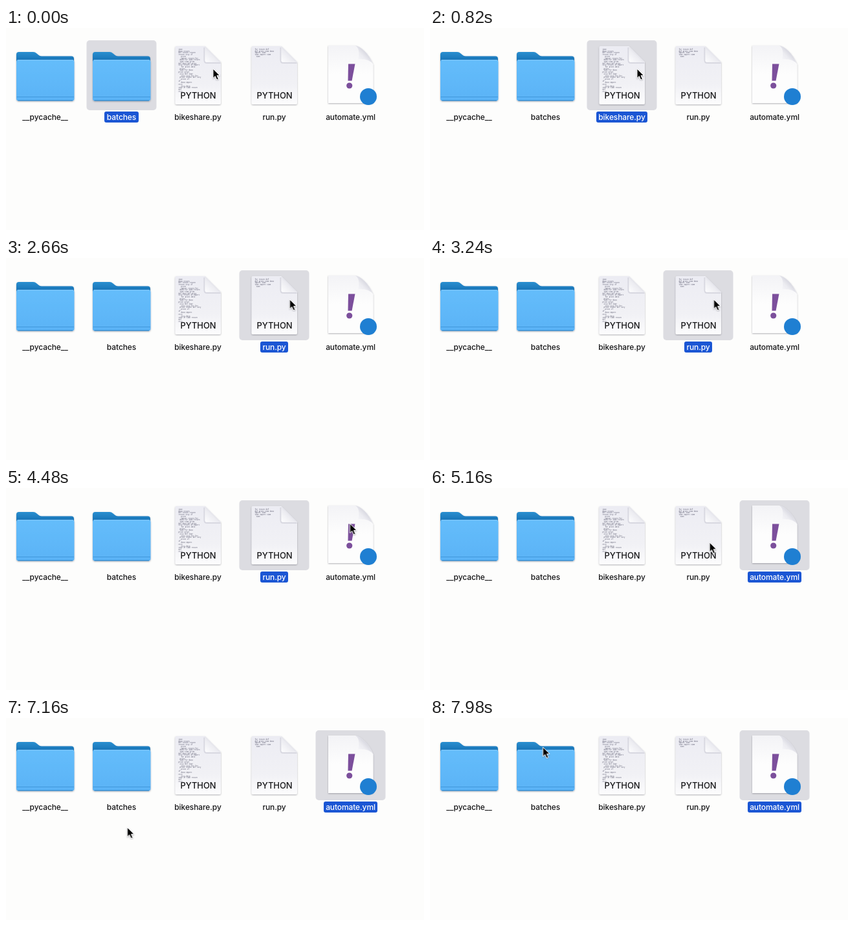
These frames come from a looping animation (646x312 px, 8000 ms). An HTML page:

```html
<!DOCTYPE html>
<html lang="en">
<head>
<meta charset="utf-8">
<title>File icons</title>
<style>
  html, body { margin: 0; width: 100%; height: 100%; overflow: hidden; background: #fdfdfc; }
  svg { display: block; width: 646px; height: 312px; }
  text { font-family: Inter, "Noto Sans", sans-serif; text-anchor: middle; fill: #161618; }
  .label { font-size: 12px; font-weight: 500; letter-spacing: -.1px; }
  .pill rect { fill: #1b56d4; }
  .pill text { fill: #fff; }
  .kind { font-size: 13px; font-weight: 500; letter-spacing: -.1px; }
  .code text { font: 2.6px "Liberation Mono", monospace; text-anchor: start; fill: #5c5c70; }

  .sel { visibility: hidden; animation: 8s step-end infinite; }
  .sel.batches { animation-name: batches; }
  .sel.bikeshare { animation-name: bikeshare; }
  .sel.run { animation-name: run; }
  .sel.automate { animation-name: automate; }
  @keyframes batches { 0% { visibility: visible } 5%, 100% { visibility: hidden } }
  @keyframes bikeshare { 0% { visibility: hidden } 5% { visibility: visible } 33%, 100% { visibility: hidden } }
  @keyframes run { 0% { visibility: hidden } 33% { visibility: visible } 59%, 100% { visibility: hidden } }
  @keyframes automate { 0% { visibility: hidden } 59%, 100% { visibility: visible } }

  #cursor { animation: glide 8s ease-in-out infinite; }
  @keyframes glide {
    0%, 10.5% { transform: translate(320px, 63px) }
    19.5%, 21.3% { transform: translate(428px, 60.5px) }
    30%, 40.5% { transform: translate(438.5px, 64px) }
    51% { transform: translate(530.5px, 54.5px) }
    56%, 60% { transform: translate(531.5px, 55px) }
    72% { transform: translate(194px, 154px) }
    73.25% { transform: translate(191px, 157px) }
    81% { transform: translate(187.5px, 173px) }
    87%, 89.5% { transform: translate(187.5px, 169px) }
    94.5% { transform: translate(180px, 96px) }
    99.5%, 100% { transform: translate(174.5px, 45px) }
  }
</style>
</head>
<body>
<svg viewBox="0 0 646 312">
  <defs>
    <linearGradient id="front" x2="0" y2="1">
      <stop stop-color="#65bdfb"/><stop offset="1" stop-color="#5ab3f6"/>
    </linearGradient>
    <linearGradient id="back" x2="0" y2="1">
      <stop stop-color="#2a8fd0"/><stop offset=".6" stop-color="#1a75b8"/>
    </linearGradient>
    <linearGradient id="paper" x2="0" y2="1">
      <stop stop-color="#ececf3"/><stop offset=".65" stop-color="#f1f1f5"/><stop offset="1" stop-color="#fcfcfd"/>
    </linearGradient>
    <linearGradient id="white" x2="0" y2="1">
      <stop stop-color="#f3f3f6"/><stop offset=".5" stop-color="#fdfdfd"/>
    </linearGradient>
    <linearGradient id="fold" x1="0" y1="1" x2=".7" y2=".3">
      <stop stop-color="#fdfdfe"/><stop offset=".6" stop-color="#ececf1"/><stop offset="1" stop-color="#d0d0da"/>
    </linearGradient>
    <filter id="shade" x="-10%" y="-10%" width="120%" height="120%">
      <feDropShadow dx="0" dy="1" stdDeviation=".9" flood-color="#55555f" flood-opacity=".45"/>
    </filter>

    <!-- symbols are drawn around x = 0, the middle of a column -->
    <g id="folder" filter="url(#shade)">
      <path fill="url(#back)" d="M-44.500 52V41q0-4 4-4h22q3 0 5 2l3 2.500q2 2 5 2h46q4 0 4 4v10h-89z"/>
      <rect x="-44.500" y="49" width="89.500" height="63.500" rx="3.500" fill="url(#front)"/>
      <path d="M-43 49.700H43.500" stroke="#84cbfb" stroke-width="1"/>
      <path d="M-44 106.500H44.500" stroke="#3f98dc" stroke-width="1"/>
      <path d="M-42 112H42.500" stroke="#2b7fbd" stroke-width="1.200"/>
    </g>
    <g id="python">
      <path filter="url(#shade)" fill="url(#paper)" d="M-33 28H11L35.500 52.500V116q0 2-2 2H-33q-2 0-2-2V30q0-2 2-2z"/>
      <path d="M10 30v20q0 4 4 4h21" fill="none" stroke="#c9c9d4" stroke-width="2" opacity=".6"/>
      <path fill="url(#fold)" d="M11 28L35.500 52.500H13q-2 0-2-2z"/>
      <text class="kind" x=".5" y="109">PYTHON</text>
    </g>
    <g id="yaml">
      <path filter="url(#shade)" fill="url(#white)" d="M-34.500 27H7Q14 28 22 36T35 56V116H-34.500z"/>
      <path fill="url(#fold)" d="M7 27Q14 28 22 36T35 56Q29 47 12 48Q15 31 7 27z"/>
      <path fill="#7c4f9c" d="M-3.500 55.500H7L2 81.500H-4z"/>
      <circle cx="-1.800" cy="89" r="4.600" fill="#7c4f9c"/>
      <circle cx="27.500" cy="106" r="13" fill="#1f7fd2"/>
    </g>
  </defs>
  <g id="icons"></g>
  <g id="cursor">
    <path d="M0 0V14.500L3.300 11.400L5.800 17L8.400 15.900L6 10.400H10.400z" fill="#000" stroke="#fff" stroke-linejoin="round" filter="url(#shade)"/>
  </g>
</svg>
<script>
  const items = [
    { label: '__pycache__', icon: 'folder' },
    { label: 'batches', icon: 'folder', sel: 'batches', pill: 53 },
    { label: 'bikeshare.py', icon: 'python', sel: 'bikeshare', pill: 79, lines: 25 },
    { label: 'run.py', icon: 'python', sel: 'run', pill: 43, lines: 5 },
    { label: 'automate.yml', icon: 'yaml', sel: 'automate', pill: 83 },
  ];

  let seed = 7;
  const random = () => (seed = seed * 16807 % 2147483647) / 2147483647;
  const words = ['import', 'data', 'def', 'print', 'for', 'city', 'return', 'if', 'time'];

  function codeLine(row) {
    const count = 1 + Math.floor(random() * 4);
    const line = Array.from({ length: count }, () => words[Math.floor(random() * words.length)]);
    const indent = row < 4 ? 0 : Math.floor(random() * 3) * 2;
    return `<text x="${-30 + indent}" y="${34 + row * 2.7}">${line.join(' ')}</text>`;
  }

  function itemMarkup({ label, icon, sel, pill, lines = 0 }, i) {
    const text = `<text class="label" y="142">${label}</text>`;
    const box = sel ? `<rect class="sel ${sel}" x="-54" y="19" width="108" height="108" rx="5" fill="#dcdce1"/>` : '';
    const marked = sel ? `<g class="sel pill ${sel}"><rect x="${-pill / 2}" y="129" width="${pill}" height="17" rx="3"/>${text}</g>` : '';
    const code = Array.from({ length: lines }, (_, row) => codeLine(row)).join('');
    return `<g transform="translate(${60.5 + i * 118} 0)">${box}<use href="#${icon}"/><g class="code">${code}</g>${text}${marked}</g>`;
  }

  document.getElementById('icons').innerHTML = items.map(itemMarkup).join('');
</script>
</body>
</html>
```
